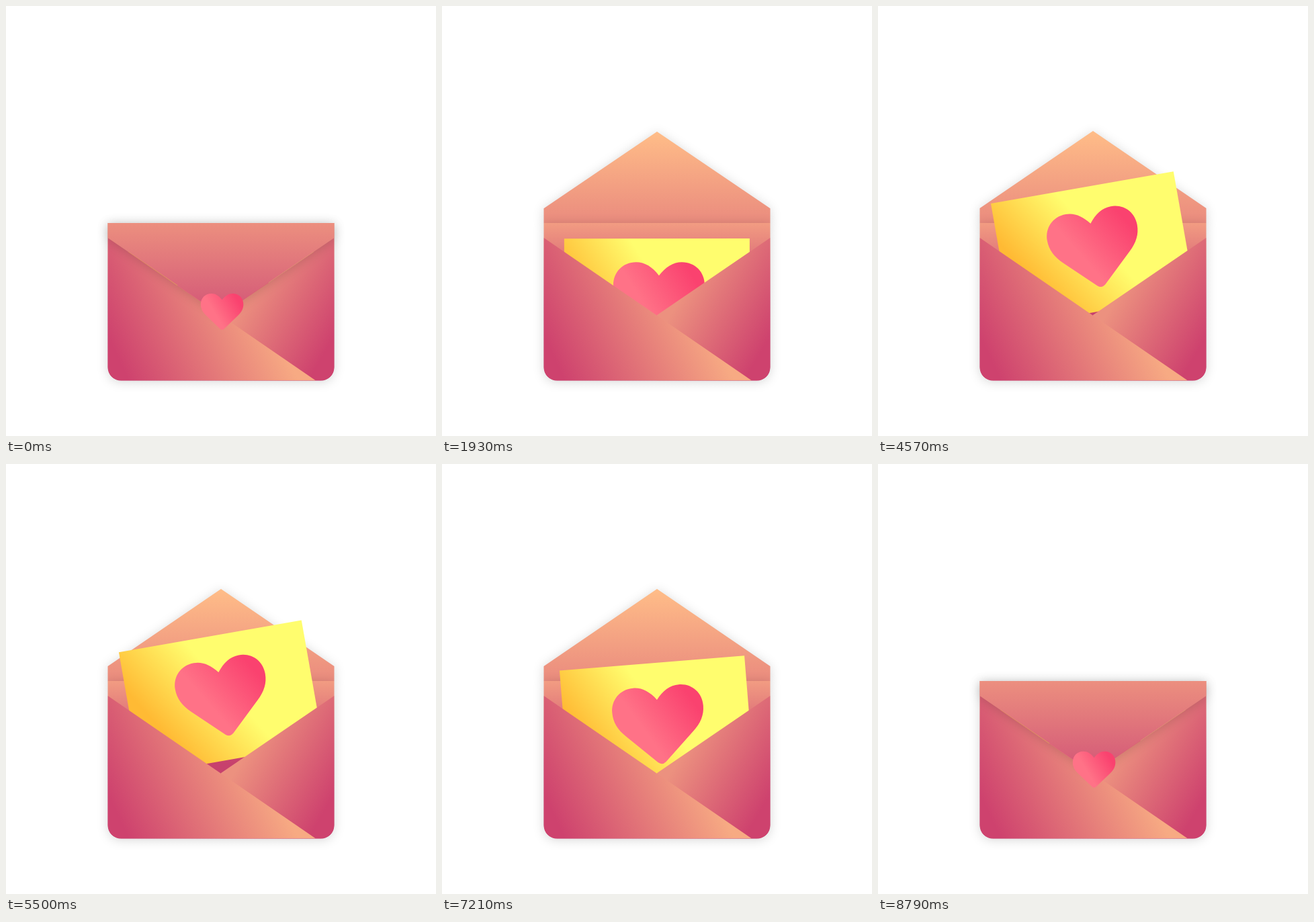
An HTML page with a canvas for the animation above (9570 ms loop, 640x640 px).

```html
<!DOCTYPE html>
<html lang="en">
<head>
<meta charset="utf-8">
<title>Love letter</title>
<style>
  html, body { margin: 0; width: 100%; height: 100%; overflow: hidden; background: #fff; }
  canvas { display: block; width: 640px; height: 640px; }
</style>
</head>
<body>
<canvas id="stage"></canvas>
<script>
const LOOP = 9570;
const L = 151.5, R = 488.5, TOP = 323, BOTTOM = 557.5, MID = 320;

const canvas = document.getElementById('stage');
const dpr = window.devicePixelRatio || 1;
canvas.width = canvas.height = 640 * dpr;
const ctx = canvas.getContext('2d');

const clamp = v => Math.max(0, Math.min(1, v));
const mix = (a, b, p) => a + (b - a) * p;
const cubic = x => x < .5 ? 4 * x ** 3 : 1 - 4 * (1 - x) ** 3;
const ease = (t, start, dur) => cubic(clamp((t - start) / dur));

function gradient(x0, y0, x1, y1, ...colors) {
  const g = ctx.createLinearGradient(x0, y0, x1, y1);
  colors.forEach((c, i) => g.addColorStop(i / (colors.length - 1), c));
  return g;
}

function polygon(points) {
  const p = new Path2D();
  points.forEach(([x, y]) => p.lineTo(x, y));
  p.closePath();
  return p;
}

const body = new Path2D();
body.roundRect(L, TOP, R - L, BOTTOM - TOP, [0, 0, 20, 20]);

const rightPanel = polygon([[R, 345], [MID, 460], [MID, BOTTOM], [R, BOTTOM]]);
const leftPanel = polygon([[L, 345], [461, BOTTOM], [L, BOTTOM]]);

const heart = new Path2D(
  'M0-38C-10-51-21-58-34-58C-54-58-68-43-68-24C-68-10-62 2-50 13' +
  'L-6 55Q0 60 6 55L50 13C62 2 68-10 68-24C68-43 54-58 34-58C21-58 10-51 0-38Z');

// Colours that do not depend on time
const paint = {
  inside: gradient(0, TOP, 0, 445, '#f29c82', '#c7416d'),
  left: gradient(165, 520, 372, 423, '#ce426e', '#f7aa83'),
  right: gradient(340, 460, 465, 532, '#ec917f', '#ce426e'),
  card: gradient(-58, 92, 38, 32, '#ffba34', '#fffd6e'),
  heart: gradient(-20, 10, 52, -34, '#ff7287', '#fa426f')
};

function withShadow(draw, alpha, blur, dy) {
  ctx.save();
  ctx.shadowColor = `rgba(0,0,0,${alpha})`;
  ctx.shadowBlur = blur * dpr;
  ctx.shadowOffsetY = dy * dpr;
  draw();
  ctx.restore();
}

function fill(path, style) {
  ctx.fillStyle = style;
  ctx.fill(path);
}

function drawFlap(s) {
  const side = TOP + 22 * s, tip = TOP + 137 * s;
  const shape = polygon([[L, TOP], [R, TOP], [R, side], [MID, tip], [L, side]]);
  const colors = s > 0 ? ['#ec8f7f', '#d25577'] : ['#ea8b7e', '#ffbd88'];
  withShadow(() => fill(shape, gradient(0, TOP, 0, tip, ...colors)), .16, 16, 2);
}

function drawHeart(x, y, scale) {
  ctx.save();
  ctx.translate(x, y);
  ctx.scale(scale, scale);
  fill(heart, paint.heart);
  ctx.restore();
}

function drawCard(out, bob) {
  ctx.save();
  ctx.translate(MID, mix(440, 330, out) + bob);
  ctx.rotate(-10 * out * Math.PI / 180);
  ctx.fillStyle = paint.card;
  ctx.fillRect(-138, -93, 276, 186);
  drawHeart(3, 0, 1);
  ctx.restore();
}

function drawPanels() {
  ctx.save();
  ctx.clip(body);
  fill(rightPanel, paint.right);
  fill(leftPanel, paint.left);
  ctx.restore();
}

function drawSeal(lift) {
  ctx.globalAlpha = clamp(1 - 1.09 * lift);
  drawHeart(321.6, mix(455, 139, lift), mix(.467, 1, lift));
  ctx.globalAlpha = 1;
}

function render(t) {
  const open = ease(t, 750, 1500) - ease(t, 7270, 1530);
  const lift = ease(t, 720, 1670) - ease(t, 7190, 1670);
  const out = ease(t, 1760, 1400) - ease(t, 6355, 1670);
  const bob = 16 * (1 - Math.cos(2 * Math.PI * clamp((t - 2900) / 3560)));
  const flap = Math.cos(Math.PI * open);

  ctx.setTransform(dpr, 0, 0, dpr, 0, 0);
  ctx.fillStyle = '#fff';
  ctx.fillRect(0, 0, 640, 640);

  if (flap <= 0) drawFlap(flap);
  withShadow(() => fill(body, paint.inside), .16, 16, 2);
  drawCard(out, bob);
  drawPanels();
  if (flap > 0) drawFlap(flap);
  drawSeal(lift);
}

const start = performance.now();
function tick() {
  render((performance.now() - start) % LOOP);
  requestAnimationFrame(tick);
}
tick();
</script>
</body>
</html>
```
